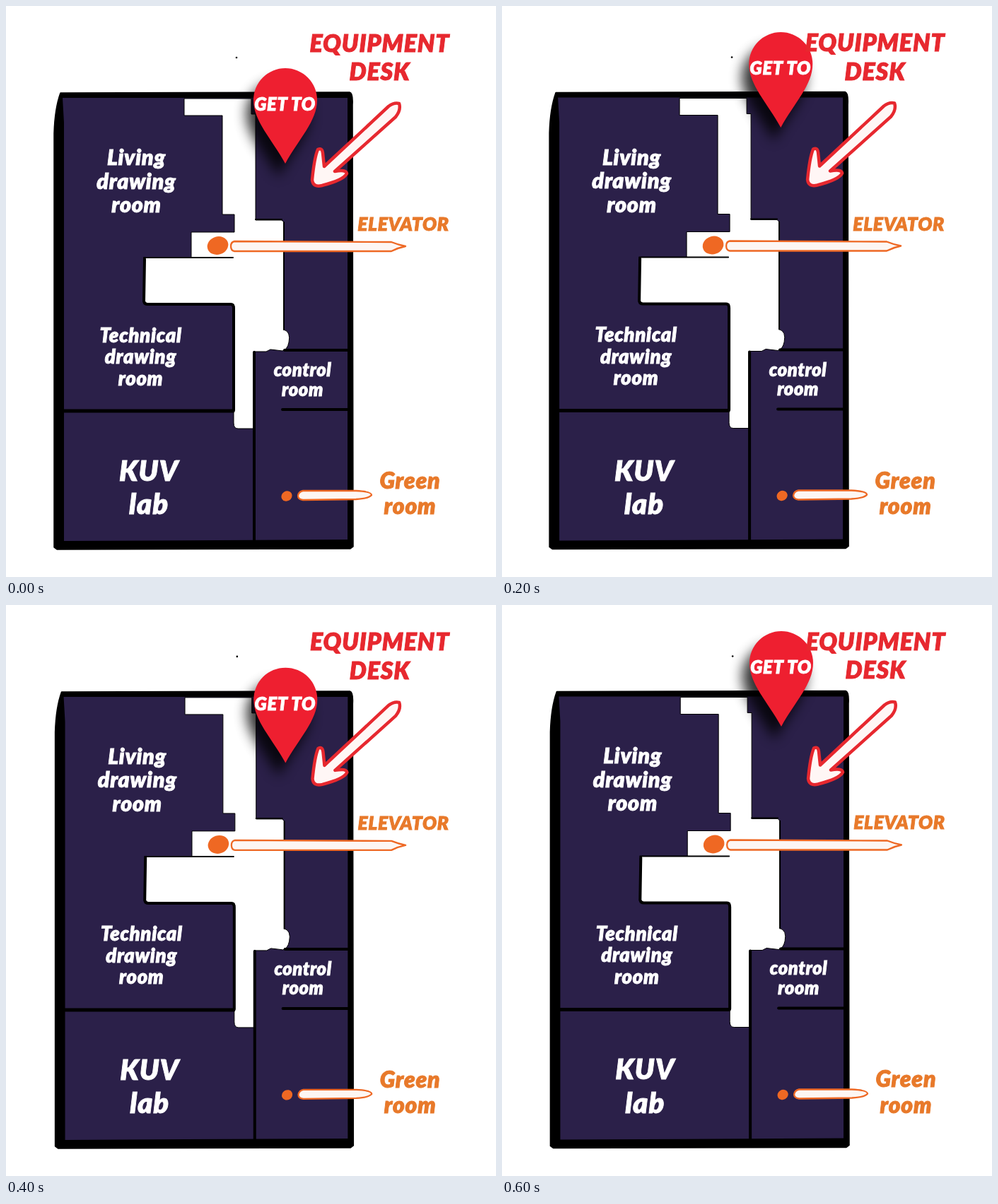
Animation of 693x808 px, one loop 0.8 s. Source, as an HTML page:

```html
<!DOCTYPE html>
<html lang="en">
<head>
<meta charset="utf-8">
<title>Floor plan</title>
<style>
  html, body { margin: 0; width: 100%; height: 100%; overflow: hidden; background: #fff; }
  svg { display: block; width: 100%; height: 100%; }
  text {
    font: italic 900 30px Lato, "Open Sans", sans-serif;
    text-anchor: middle; letter-spacing: .025em;
    stroke: currentColor; fill: currentColor; stroke-width: .9;
  }
  .wall { fill: none; stroke: #000; stroke-linecap: round; stroke-linejoin: round; }
  .bar { fill: #fdf6f3; stroke: #ee6824; stroke-width: 2.3; stroke-linejoin: round; }
</style>
</head>
<body>
<svg viewBox="0 0 693 808">
  <defs>
    <filter id="blur" x="-50%" y="-50%" width="200%" height="200%"><feGaussianBlur stdDeviation="9"/></filter>
    <path id="drop" d="M395 223C376 188 350 163 350 133A45 45 0 0 1 440 133C440 163 414 188 395 223Z"/>
  </defs>
  <g id="plan">
    <path stroke="#000" stroke-width="1.5" stroke-linejoin="round"
      d="M77 123L486 122Q491 123 490 140L491 765L487 768L72 769L68 766V180Q69 145 77 123Z"/>
    <path fill="#2b2049" d="M80 130H483V755L82 757V165Z"/>
    <path fill="#fff" stroke="#000" stroke-linejoin="round"
      d="M252 131V155H306V295H323V320H262V356H195V422H322V590Q322 598 328 598H350V489L368 489L374 486L391 488Q398 486 400 476Q403 461 393 458V306L390 303H353V153H347V131Z"/>
    <path class="wall" stroke-width="2" d="M195 356H321M393 306V458M353 302H390"/>
    <path class="wall" stroke-width="4" d="M196 358L195 418Q196 422 200 422H318Q322 422 322 428V572M351 490V756M394 487H484M391 571H484"/>
    <path class="wall" stroke-width="5" d="M80 573H321"/>
    <circle cx="326" cy="73" r="1.3"/>
    <path fill="#fff6f5" stroke="#e7282f" stroke-width="4.5" stroke-linejoin="round"
      d="M541 142Q549 136 556 138Q559 147 551 157L465 234Q481 231 482 237Q478 246 447 254Q434 257 433 246Q436 215 441 203Q447 200 448 208L450 227Z"/>
    <path class="bar" d="M323 333L545 334Q555 338 565 340Q555 342 545 347L323 347Q318 346 318 340Q318 334 323 333Z"/>
    <path class="bar" d="M420 686L495 686Q517 687 517 692Q513 697 495 698L420 699Q413 698 413 693Q414 687 420 686Z"/>
    <g fill="#ef6823">
      <ellipse cx="299.5" cy="339" rx="15" ry="12.7" transform="rotate(-18 299.5 339)"/>
      <ellipse cx="397" cy="693.5" rx="7.8" ry="7" transform="rotate(-30 397 693.5)"/>
    </g>
  </g>
  <g id="pin">
    <use href="#drop" x="-10" y="19" opacity=".8" filter="url(#blur)"/>
    <use href="#drop" fill="#ee1f30"/>
    <text x="394.5" y="148" style="font-size:25.5px" color="#fff">GET TO</text>
  </g>
  <g id="labels"></g>
</svg>
<script>
const $ = id => document.getElementById(id);
const plan = $('plan'), pin = $('pin'), labels = $('labels');
const white = '#fff', red = '#e7282f', orange = '#e8792a';

function label(x, y, step, size, color, ...lines) {
  lines.forEach((line, i) => {
    const t = document.createElementNS('http://www.w3.org/2000/svg', 'text');
    t.setAttribute('x', x);
    t.setAttribute('y', y + i * step);
    t.setAttribute('color', color);
    t.style.fontSize = size + 'px';
    t.textContent = line;
    labels.append(t);
  });
}
label(184.5, 225, 33.5, 30.5, white, 'Living', 'drawing', 'room');
label(190.5, 475.5, 30.5, 27.5, white, 'Technical', 'drawing', 'room');
label(419.5, 524, 27.5, 25.5, white, 'control', 'room');
label(202, 672, 47, 40, white, 'KUV', 'lab');
label(528.5, 64.5, 40.5, 34, red, 'EQUIPMENT', 'DESK');
label(562, 318, 0, 26.5, orange, 'ELEVATOR');
label(571.5, 683, 36, 32, orange, 'Green', 'room');

// Hand-drawn wobble: x scale, x shift, y shift; the pin hops between two heights.
const poses = [[1, 0, 0], [1, -.9, -.5], [.997, 1.8, -.1], [.999, .5, -.5]];

function draw(now) {
  const i = Math.floor(now / 200) % 4;
  const [sx, dx, dy] = poses[i];
  const wobble = `matrix(${sx} 0 0 1 ${dx} ${dy})`;
  plan.setAttribute('transform', wobble);
  labels.setAttribute('transform', wobble);
  pin.setAttribute('transform', `translate(${[0, -.7, .3, 0][i]} ${[0, -51, .6, -51][i]})`);
  requestAnimationFrame(draw);
}
draw(performance.now());
</script>
</body>
</html>
```
